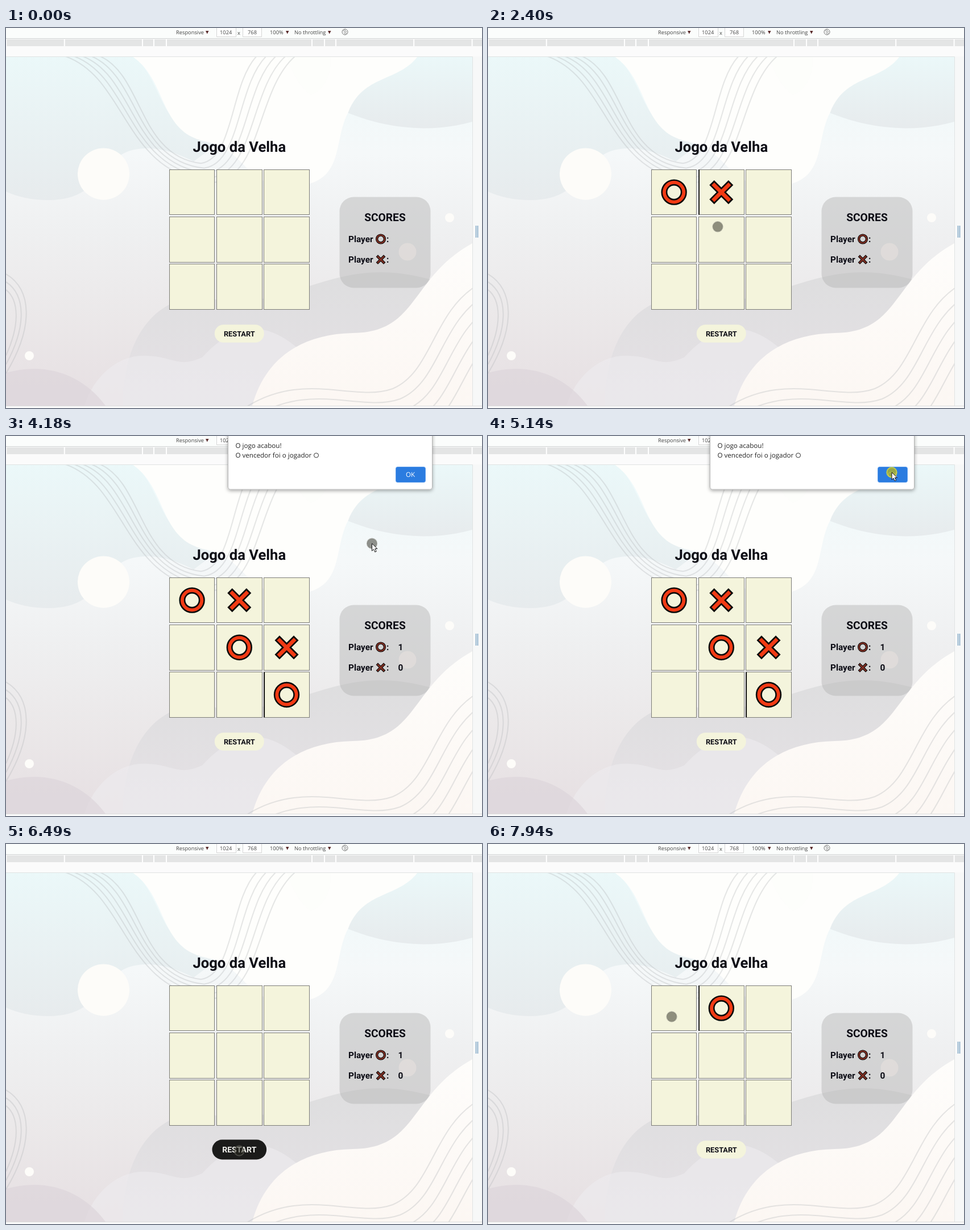
Recreate the animation shown at these times as an HTML page. Size 837 by 669 pixels, loop 8 s.

```html
<!DOCTYPE html>
<html lang="pt">
<head>
<meta charset="utf-8">
<title>Jogo da Velha</title>
<style>
  html, body { margin: 0; width: 100%; height: 100%; overflow: hidden; background: #fbfbfb; }
  svg { display: block; width: 837px; height: 669px; text-rendering: geometricPrecision; }
  .page { font: 600 15.36px Roboto, sans-serif; fill: #0b0b14; }
  .tool { font: 9.3px "Open Sans", sans-serif; fill: #444; }
  .dialog { font: 11.6px "Open Sans", sans-serif; fill: #222; }
  .mid { text-anchor: middle; }
  .line { fill: none; stroke: #b4b6b8; stroke-opacity: .34; stroke-width: 2; }
  .line path { vector-effect: non-scaling-stroke; }
</style>
</head>
<body>
<svg viewBox="0 0 837 669">
  <defs>
    <linearGradient id="sky" gradientUnits="userSpaceOnUse" x1="0" y1="50" x2="0" y2="665">
      <stop offset="0" stop-color="#eefafb"/><stop offset=".28" stop-color="#f5f8f9"/>
      <stop offset=".5" stop-color="#eff0f1"/><stop offset=".75" stop-color="#ebe8e9"/>
      <stop offset="1" stop-color="#e6dfe2"/>
    </linearGradient>
    <linearGradient id="hill" x2="0" y2="1">
      <stop offset="0" stop-color="#ebf8f9"/><stop offset="1" stop-color="#e7ebed"/>
    </linearGradient>
    <linearGradient id="grey" x2="0" y2="1">
      <stop offset="0" stop-color="#dededf"/><stop offset="1" stop-color="#e5e1e5"/>
    </linearGradient>
    <linearGradient id="cream" x2="0" y2="1">
      <stop offset="0" stop-color="#fefdfb"/><stop offset="1" stop-color="#fcf7f3"/>
    </linearGradient>
    <clipPath id="pageClip"><path d="M0 50H820V665H0z"/></clipPath>
    <filter id="shadow" x="-10%" y="-20%" width="120%" height="150%">
      <feDropShadow dx="0" dy="2" stdDeviation="3" flood-opacity=".35"/>
    </filter>
    <g id="O" fill="none">
      <circle r="17.2" stroke="#0b0b0b" stroke-width="11"/>
      <circle r="17.2" stroke="currentColor" stroke-width="5.8"/>
    </g>
    <g id="X">
      <path d="M-16.8-16.8 16.8 16.8M16.8-16.8-16.8 16.8" stroke="#0b0b0b" stroke-width="12"/>
      <path d="M-14.8-14.8 14.8 14.8M14.8-14.8-14.8 14.8" stroke="currentColor" stroke-width="6.6"/>
    </g>
    <path id="drop" d="M0 5h5.500l-2.750 5.500z" fill="#5a2a2a"/>
  </defs>

  <!-- browser chrome -->
  <path d="M0 0H837V18H0z" fill="#fbfdfc"/>
  <path d="M0 18.500H837" stroke="#cfd2d2"/>
  <path d="M0 20H837V32H0z" fill="#e4e5e5"/>
  <path id="ticks" stroke="#fff" stroke-width="2"/>
  <path d="M821 50H837V665H821z" fill="#f7f8f8"/>
  <path d="M0 665.500H837" stroke="#dcdcdc"/>
  <path d="M826.500 348V369M829.500 348V369" stroke="#7ba3c4" stroke-width="1.500"/>
  <g class="tool">
    <path d="M370.500-1V15.500H404.500V-1M416.500-1V15.500H449.500V-1" fill="#fff" stroke="#d5d5d5"/>
    <text x="299" y="11">Responsive</text>
    <text x="376" y="11">1024</text><text x="407" y="12">x</text><text x="425" y="11">768</text>
    <text x="464" y="11">100%</text><text x="507" y="11">No throttling</text>
    <use href="#drop" x="351"/><use href="#drop" x="492"/><use href="#drop" x="566"/>
    <g fill="none" stroke="#777"><circle cx="596" cy="7" r="5"/><path d="M592 3l8 8M594 8l3 3M595 3l4 4"/></g>
  </g>

  <!-- backdrop -->
  <g clip-path="url(#pageClip)">
    <path d="M0 50H820V665H0z" fill="url(#sky)"/>
    <path d="M0 50H225C275 90 270 190 370 205L330 235C290 215 255 205 215 217C165 235 165 303 75 303C45 303 20 297 0 288z" fill="url(#hill)"/>
    <path d="M570 50H820V165C750 185 660 181 570 135z" fill="url(#hill)"/>
    <path d="M222 50C282 90 270 180 345 198C425 213 415 278 500 279C600 276 573 200 602 148C628 82 690 95 724 50z" fill="#fefefc"/>
    <path d="M495 50H570C575 90 550 115 535 118C515 100 500 75 495 50z" fill="#f7faf8" opacity=".25"/>
    <path d="M205 665C205 570 245 475 345 473C470 505 540 430 660 430C720 430 760 450 820 458V665z" fill="url(#grey)"/>
    <path d="M138 665C155 610 200 577 240 577C295 577 300 600 345 580C400 520 455 510 520 570L435 665z" fill="#efedf1" opacity=".6"/>
    <path d="M0 607C70 587 135 610 175 665H0z" fill="#dcd5da" opacity=".65"/>
    <path d="M433 665C455 585 515 539 610 537C725 536 710 440 820 379V665z" fill="url(#cream)"/>
    <g id="waves" class="line"></g>
    <g fill="#fdfcf9">
      <circle cx="171.500" cy="257" r="45.500"/><circle cx="780" cy="334" r="8"/><circle cx="41" cy="577" r="8"/>
    </g>
  </g>
  <path d="M0 50.500H820.500V665" fill="none" stroke="#e0e3e3"/>

  <!-- game -->
  <g class="page">
    <text class="mid" x="410.300" y="218.300" font-size="25.6">Jogo da Velha</text>
    <g id="board"></g>
    <path id="focus" stroke="#000" stroke-width="1.600"/>
    <g id="button">
      <rect x="-43.500" y="-15.800" width="87" height="31.600" rx="15.800"/>
      <text class="mid" y="4.600" font-size="12.8">RESTART</text>
    </g>
    <rect x="586.500" y="297.500" width="160" height="160" rx="25" fill="#b4b4b4" fill-opacity=".46"/>
    <circle cx="706" cy="394" r="15.500" fill="#f6ece6" opacity=".35"/>
    <text class="mid" x="666.500" y="340.300" font-size="19.2">SCORES</text>
    <text x="602" y="377">Player</text><text x="669" y="377">:</text>
    <text x="602" y="413">Player</text><text x="669" y="413">:</text>
    <g color="#7f2e22">
      <use href="#O" transform="translate(659 371.500) scale(.4)"/>
      <use href="#X" transform="translate(659 407.700) scale(.4)"/>
    </g>
    <g id="scores"><text x="689.500" y="377">1</text><text x="689.500" y="413">0</text></g>
  </g>

  <g id="dialog" class="dialog">
    <rect x="390.500" y="-10" width="359" height="104" rx="4" fill="#fff" stroke="#b5b5b5" filter="url(#shadow)"/>
    <text x="403.500" y="21">O jogo acabou!</text>
    <text x="403.500" y="38">O vencedor foi o jogador</text>
    <circle cx="545.500" cy="34" r="4" fill="none" stroke="#333"/>
    <rect x="685.500" y="54.500" width="52" height="27" rx="3" fill="#2b7ce0" stroke="#5c9cec"/>
    <text class="mid" x="711" y="72" style="fill:#fff">OK</text>
  </g>

  <g id="cursor">
    <circle id="halo" r="8.700" stroke-width="2"/>
    <path id="arrow" d="M0 0V13L3 10.200 5.200 15 7.600 14 5.400 9.300H9.500z" fill="#fff" stroke="#111"/>
  </g>
</svg>

<script>
const LOOP = 8000, PRESS = 70, PITCH = 83.2, SIZE = 79.4;
const $ = id => document.getElementById(id);
const show = (node, on) => node.style.display = on ? '' : 'none';
const cellX = i => 287.4 + PITCH * (i % 3);
const cellY = i => 249.4 + PITCH * Math.floor(i / 3);

// Ruler marks sit at common device widths, mirrored about the page centre.
$('ticks').setAttribute('d', [320, 375, 425, 768, 1024]
  .map(w => `M${410 - w * .4} 20v12M${410 + w * .4} 20v12`).join(''));

// Repeats a curve, shifting each copy and shrinking it about a pivot.
function bundle(d, count, [px, py], [sx, sy], [dx, dy]) {
  for (let k = 0; k < count; k++)
    $('waves').innerHTML += `<path d="${d}" transform="translate(${px + dx * k} ${py + dy * k})
      scale(${1 - sx * k} ${1 - sy * k}) translate(${-px} ${-py})"/>`;
}
bundle('M105 50C215 90 205 258 365 272C450 262 440 110 508 50', 5, [296, 50], [.08, .038], [0, 0]);
bundle('M415 672C520 600 610 660 680 635C750 605 750 500 830 452', 5, [0, 0], [0, 0], [13, 18]);
bundle('M0 433C45 460 50 525 0 608', 3, [0, 515], [.25, .17], [0, 0]);

for (let i = 0; i < 9; i++)
  $('board').innerHTML += `<rect x="${cellX(i)}" y="${cellY(i)}" width="${SIZE}" height="${SIZE}"
    fill="#f4f4dc" stroke="#7d7d78" shape-rendering="crispEdges"/>
    <use color="#f23a14" transform="translate(${cellX(i) + SIZE / 2} ${cellY(i) + SIZE / 2})"/>`;
const marks = document.querySelectorAll('#board use');

// Cursor stops; the cursor leaves right after the previous click unless told otherwise.
const stops = [
  { x: 14, y: 216, arrive: 520 },
  { x: 330, y: 294, arrive: 1200, click: 1660, cell: 0 },
  { x: 404, y: 294, arrive: 2000, click: 2190, cell: 1 },
  { x: 404, y: 392, arrive: 2670, click: 2810, cell: 4 },
  { x: 504, y: 392, arrive: 2950, click: 3160, cell: 5 },
  { x: 503, y: 454, arrive: 3430, click: 3630, cell: 8 },
  { x: 710, y: 64, arrive: 4810, click: 5140 },
  { x: 357, y: 565, arrive: 5900 },
  { x: 410, y: 540, arrive: 6250, click: 6350, restart: true },
  { x: 401, y: 291, leave: 6770, arrive: 7190, click: 7380, cell: 1 },
  { x: 323, y: 304, arrive: 7940 }
];
const [WIN, OK, RESTART, REPLAY] = [5, 6, 8, 9].map(i => stops[i].click + PRESS);
const easeOut = u => 1 - (1 - u) ** 2;

function cursorAt(t) {
  let { x, y } = stops[0];
  stops.slice(1).forEach((stop, i) => {
    const before = stops[i];
    const leave = stop.leave ?? (before.click ? before.click + PRESS : before.arrive);
    const e = easeOut(Math.min(1, Math.max(0, (t - leave) / (stop.arrive - leave))));
    x += (stop.x - x) * e;
    y += (stop.y - y) * e;
  });
  return [x, y];
}

// Replays the clicks made so far; players alternate, starting with O.
function boardAt(t) {
  let placed = [];
  for (const { click, cell, restart } of stops) {
    if (!(t >= click + PRESS)) continue;
    if (restart) placed = [];
    else if (cell !== undefined) placed.push(cell);
  }
  return placed;
}

function draw(t) {
  const placed = boardAt(t), focused = placed.at(-1);
  marks.forEach((mark, i) => {
    const turn = placed.indexOf(i);
    show(mark, turn >= 0);
    mark.setAttribute('href', turn % 2 ? '#X' : '#O');
  });
  show($('focus'), placed.length);
  if (placed.length) $('focus').setAttribute('d', `M${cellX(focused) + .5} ${cellY(focused)}v${SIZE}`);
  show($('scores'), t >= WIN);

  const hover = t >= 6100 && t < REPLAY - PRESS;
  const [shape, label] = $('button').children;
  $('button').setAttribute('transform', `translate(410.300 538) scale(${hover ? 1.1 : 1})`);
  shape.setAttribute('fill', hover ? '#1b1b1a' : '#f4f4dc');
  label.setAttribute('fill', hover ? '#f2f2ee' : '#0b0b14');

  const modal = t >= WIN + PRESS && t < OK;
  show($('dialog'), modal);
  show($('arrow'), modal);
  show($('cursor'), t >= stops[0].arrive);
  $('cursor').setAttribute('transform', `translate(${cursorAt(t)})`);
  const pressed = stops.some(({ click }) => t >= click && t < click + PRESS);
  $('halo').setAttribute('fill', pressed ? 'rgba(180,180,30,.78)' : 'rgba(40,40,30,.5)');
  $('halo').setAttribute('stroke', pressed ? 'rgba(222,222,60,.75)' : 'rgba(125,125,115,.45)');
}

const start = performance.now();
(function frame() {
  draw((performance.now() - start) % LOOP);
  requestAnimationFrame(frame);
})();
</script>
</body>
</html>
```
